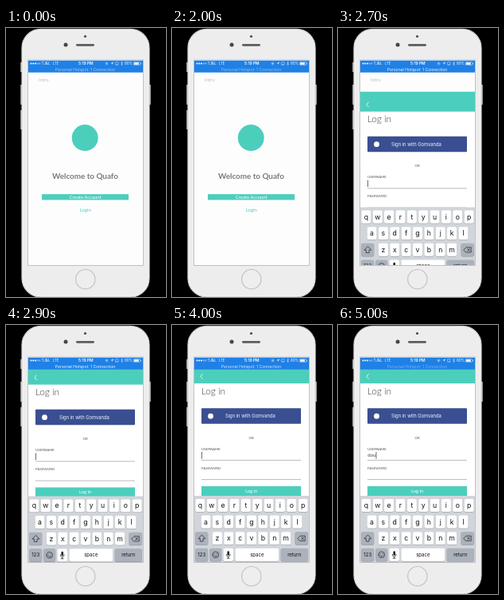
Animation, 201 px wide and 337 px high, one loop 5.1 s. Source, as an HTML page:

```html
<!DOCTYPE html>
<html lang="en">
<head>
<meta charset="utf-8">
<title>Login flow</title>
<style>
  html, body { margin: 0; width: 100%; height: 100%; overflow: hidden; background: #000; }
  svg { display: block; width: 100vw; height: 100vh; }
  text { font-family: Lato, sans-serif; }
  .ui, .ui text { font-family: Inter, sans-serif; }
  .mid { text-anchor: middle; }
  .teal { fill: #4ccebd; }
  .label { font-size: 4.4px; fill: #555; }
  .rule { stroke: #8c8c8c; stroke-width: .6; }
  .icon { fill: none; stroke: #222; stroke-width: .7; stroke-linejoin: round; stroke-linecap: round; }
</style>
</head>
<body>
<svg viewBox="0 0 201 337" xmlns="http://www.w3.org/2000/svg">
  <defs>
    <clipPath id="screen"><rect x="28" y="40.5" width="144" height="256.5"/></clipPath>
  </defs>

  <!-- Phone -->
  <g fill="#c9c9cb">
    <rect x="18.3" y="43" width="2" height="12"/>
    <rect x="18.3" y="71" width="2" height="25"/>
    <rect x="18.3" y="103" width="2" height="24"/>
    <rect x="179.7" y="71" width="2" height="25"/>
  </g>
  <rect x="20" y="1.4" width="160" height="335.6" rx="23.5" fill="#ededee" stroke="#d0d0d2" stroke-width="1.2"/>
  <rect x="21.4" y="2.8" width="157.2" height="332.8" rx="22" fill="none" stroke="#f5f5f5" stroke-width=".8"/>
  <circle cx="99.5" cy="10.5" r="1.6" fill="#4b4b50"/>
  <circle cx="75" cy="21" r="2.5" fill="#45454b"/>
  <rect x="88" y="19.9" width="23" height="2.8" rx="1.4" fill="#5c5c61"/>
  <circle cx="99.8" cy="314.7" r="12.2" fill="#eeeeef" stroke="#c3c3c6" stroke-width="1.2"/>
  <rect x="27.6" y="40.1" width="144.8" height="257.3" fill="none" stroke="#bcbcbf" stroke-width="1"/>

  <g clip-path="url(#screen)">
    <!-- Intro -->
    <rect x="28" y="40" width="144" height="258" fill="#fdfdfd"/>
    <text x="41" y="67" font-size="6" fill="#bdbdbd">Intro</text>
    <circle class="teal" cx="99.2" cy="137.6" r="16.5"/>
    <text class="mid" x="99.4" y="189" font-size="9.9" font-weight="700" fill="#7c7c7c">Welcome to Quafo</text>
    <rect class="teal" x="45" y="208.2" width="109" height="7.2"/>
    <text class="mid" x="99.8" y="213.9" font-size="5.9" fill="#fff">Create Account</text>
    <text class="mid teal" id="login" x="99.8" y="230" font-size="6">Login</text>

    <!-- Log in sheet -->
    <g id="sheet">
      <rect x="28" y="48.3" width="144" height="257" fill="#fff"/>
      <rect class="teal" x="28" y="48.3" width="144" height="24.9"/>
      <path d="M38.6 61.2 35.8 64.4 38.6 67.6" fill="none" stroke="#fff" stroke-width=".8"/>
      <text x="36.8" y="87" font-size="11.8" font-weight="300" fill="#444">Log in</text>
      <rect x="37" y="104.3" width="125" height="19.4" rx="1" fill="#3a4f92"/>
      <circle cx="48.5" cy="114.2" r="3.4" fill="#fff"/>
      <text class="ui mid" x="98.4" y="116.4" font-size="5.8" fill="#f4f6fb">Sign in with Gomvanda</text>
      <text class="mid label" x="99.6" y="142.6">OR</text>
      <text class="label" x="37" y="156.7">USERNAME</text>
      <text id="typed" x="37.2" y="165.4" font-size="6" fill="#444"></text>
      <rect id="caret" x="37.2" y="159" width=".8" height="8.6" fill="#37456f"/>
      <path class="rule" d="M37 169.4H162M37 193.6H162"/>
      <text class="label" x="37" y="180.7">PASSWORD</text>
      <rect class="teal" x="37" y="202" width="125" height="12.6"/>
      <text class="mid" x="99.6" y="210" font-size="5.9" fill="#fff">Log in</text>
    </g>

    <g id="board" class="ui"><rect x="28" y="214" width="144" height="84" fill="#d1d5da"/></g>

    <!-- Status bar -->
    <g class="ui" fill="#fff">
      <rect x="28" y="40.5" width="144" height="15.2" fill="#1f80e6"/>
      <circle cx="31.5" cy="44.5" r="1"/>
      <circle cx="34.2" cy="44.5" r="1"/>
      <circle cx="36.9" cy="44.5" r="1"/>
      <g fill="none" stroke="#fff" stroke-width=".4">
        <circle cx="39.6" cy="44.5" r=".8"/>
        <circle cx="42.3" cy="44.5" r=".8"/>
        <circle cx="126.5" cy="44.5" r="1.5"/>
        <rect x="137.4" y="42.7" width="3.8" height="3.6" rx=".7"/>
        <path d="M138.3 45.5H140.3M144.4 43.3 146.6 45.6 145.5 46.8V42.2L146.6 43.4 144.4 45.7"/>
        <rect x="160.2" y="42.6" width="8.6" height="3.9" rx=".7"/>
      </g>
      <circle cx="126.5" cy="44.5" r=".6"/>
      <path d="M135 42.5 131.4 44.3H133.2V46.1Z"/>
      <rect x="160.9" y="43.3" width="5.9" height="2.5"/>
      <rect x="169.2" y="43.8" width=".7" height="1.5"/>
      <text x="44.6" y="46.3" font-size="4.7">TJ&amp;L</text>
      <text x="59" y="46.3" font-size="4.2">LTE</text>
      <text class="mid" x="100.3" y="46.4" font-size="4.9" font-weight="600">5:19 PM</text>
      <text x="149" y="46.3" font-size="4.5">80%</text>
      <text class="mid" id="hotspot" x="99.5" y="54" font-size="5.1">Personal Hotspot: 1 Connection</text>
    </g>
  </g>
</svg>
<script>
const LOOP = 5100, STEP = 100;
const NS = 'http://www.w3.org/2000/svg';
const $ = id => document.getElementById(id);
const login = $('login'), sheet = $('sheet'), board = $('board');
const typed = $('typed'), caret = $('caret'), hotspot = $('hotspot');

function add(parent, tag, attrs, text = '') {
  const el = document.createElementNS(NS, tag);
  for (const k in attrs) el.setAttribute(k, attrs[k]);
  el.textContent = text;
  return parent.appendChild(el);
}

// Keyboard
const KEY = 12.1, PITCH = 14.36, ROW = 20.6, TOP = 218, HEIGHT = 16.1;
const GRAY = '#abb2bc';
const centers = {};

function key(x, row, width, label, size, fill = '#fff') {
  const y = TOP + row * ROW;
  add(board, 'rect', { x, y: y + .5, width, height: HEIGHT, rx: 1.8, fill: '#8b8f96' });
  add(board, 'rect', { x, y, width, height: HEIGHT, rx: 1.8, fill });
  add(board, 'text', { x: x + width / 2, y: y + 8 + size * .34, 'font-size': size, class: 'mid', fill: '#111' }, label);
}

['qwertyuiop', 'asdfghjkl', 'zxcvbnm'].forEach((letters, row) => {
  const first = 100 - (letters.length - 1) * PITCH / 2;
  [...letters].forEach((c, i) => {
    const x = first + i * PITCH;
    centers[c] = [x, TOP + row * ROW];
    key(x - KEY / 2, row, KEY, c, 8.7);
  });
});

key(29.2, 2, 16, '', 6, GRAY);
key(154.6, 2, 16.2, '', 6, GRAY);
key(29.2, 3, 16, '123', 6, GRAY);
key(47.4, 3, 14.8, '', 6, GRAY);
key(64.4, 3, 12.6, '', 6);
key(79.3, 3, 55, 'space', 6);
key(136.7, 3, 34.1, 'return', 6, GRAY);

const icon = d => add(board, 'path', { d, class: 'icon' });
icon('M37.2 263.2 33 267.6H35.3V271H39.1V267.6H41.4Z');
icon('M158 267.3 161 264.2H167.2V270.4H161ZM162.8 265.9 165.4 268.7M165.4 265.9 162.8 268.7');
icon('M51 287.8a3.8 3.8 0 1 0 7.6 0a3.8 3.8 0 1 0-7.6 0M53.4 286.5V286.7M56.2 286.5V286.7M52.8 288.7Q54.8 291.4 56.8 288.7');
icon('M68.2 287.2Q68.2 290.3 70.7 290.3T73.2 287.2M70.7 290.3V292.3M69.2 292.3H72.2');
add(board, 'rect', { x: 69.4, y: 283.2, width: 2.6, height: 5.6, rx: 1.3, fill: '#222' });

const popup = add(board, 'g', {});
add(popup, 'path', {
  d: 'M-8-19H8Q10-19 10-17V-7Q10-3 6 0V14Q6 16 4 16H-4Q-6 16-6 14V0Q-10-3-10-7V-17Q-10-19-8-19Z',
  fill: '#fff', stroke: '#b4b8be', 'stroke-width': .4
});
const popupText = add(popup, 'text', { y: -5, 'font-size': 13, class: 'mid', fill: '#111' });

// Motion
const RISE = 2503;
const PRESSES = [
  { c: 'd', down: 4300, shown: 4400 },
  { c: 'o', down: 4500, shown: 4600 },
  { c: 'u', down: 4800, shown: 4800 }
];
const PULSE = [[0, .6], [1200, .2], [1700, .2], [2000, .5], [2700, .95], [3300, 1], [3600, 1], [5100, .36]];

// Critically damped spring: 1 before the start, settling to 0.
function spring(ms) {
  const wt = 18.26 * Math.max(0, ms) / 1000;
  return (1 + wt) * Math.exp(-wt);
}

function pulse(t) {
  const i = PULSE.findIndex(p => p[0] > t);
  const [t0, a] = PULSE[i - 1], [t1, b] = PULSE[i];
  return a + (b - a) * (t - t0) / (t1 - t0);
}

function caretAlpha(t) {
  if (t < 3200 || t >= 3800) return 1;
  if (t < 3300) return .5;
  return t < 3700 ? 0 : .5;
}

function render(t) {
  const away = spring(t - RISE);
  sheet.setAttribute('transform', `translate(0 ${250 * away})`);
  board.setAttribute('transform', `translate(0 ${84 * away})`);
  hotspot.setAttribute('opacity', pulse(t));
  login.setAttribute('opacity', t >= 2100 && t < 2400 ? .35 : 1);

  typed.textContent = PRESSES.filter(p => t >= p.shown).map(p => p.c).join('');
  const width = typed.textContent ? typed.getComputedTextLength() + .3 : 0;
  caret.setAttribute('x', 37.2 + width);
  caret.setAttribute('opacity', caretAlpha(t));

  const press = PRESSES.find(p => t >= p.down && t < p.down + 100);
  popup.setAttribute('visibility', press ? 'visible' : 'hidden');
  if (press) {
    popup.setAttribute('transform', `translate(${centers[press.c]})`);
    popupText.textContent = press.c;
  }
}

const start = performance.now();
function tick() {
  const t = (performance.now() - start) % LOOP;
  render(Math.floor(t / STEP) * STEP);
  requestAnimationFrame(tick);
}
tick();
</script>
</body>
</html>
```
